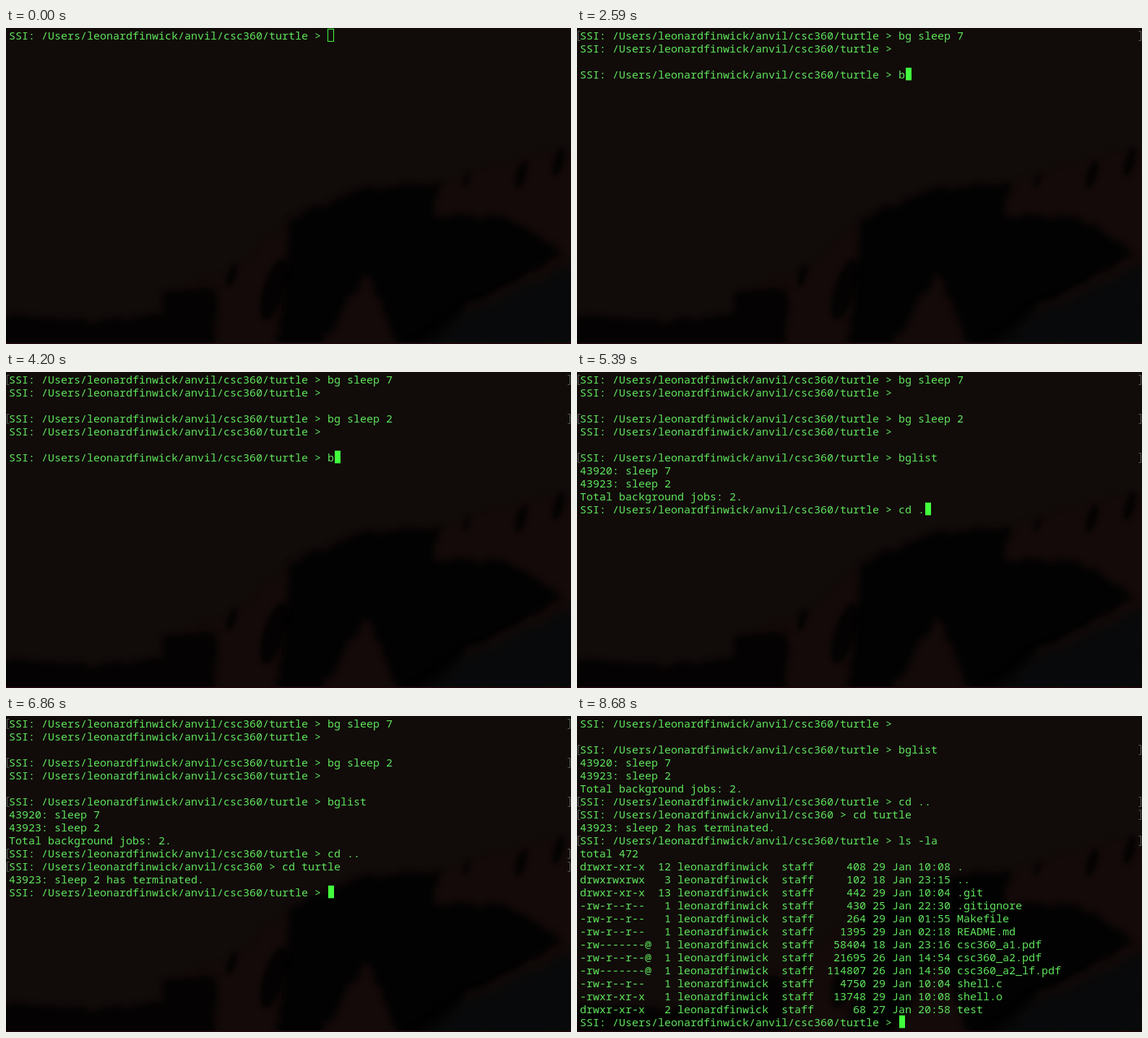
Animation, 782 px wide and 438 px high, one loop 8.75 s. Source, as an HTML page with a canvas:

```html
<!DOCTYPE html>
<html lang="en">
<head>
<meta charset="utf-8">
<title>Shell session</title>
<style>
html, body { margin: 0; width: 100%; height: 100%; overflow: hidden; background: #110b0a; }
#stage { position: relative; width: 782px; height: 438px; overflow: hidden; }
canvas { position: absolute; left: 0; top: 0; }
pre {
  position: absolute; left: 4px; top: 1px; margin: 0;
  font: 300 15px/18px "Noto Sans Mono", "DejaVu Sans Mono", monospace;
  font-variant-ligatures: none;
  color: #5fe65c;
}
</style>
</head>
<body>
<div id="stage"><canvas id="view" width="782" height="438"></canvas><pre id="text"></pre></div>
<script>
const W = 782, H = 438, LOOP = 8750, STEP = 70;
const LEFT = 4, TOP = 1, ROW = 18, COL = 9, ROWS = 24;
const KEY = 97, PAUSE = 100, FOCUS = 280;   // ms per key, before return, until focused
const GREEN = '#42ff3e';
const ctx = document.getElementById('view').getContext('2d');
const text = document.getElementById('text');

const USER = 'leonardfinwick';
const prompt = dir => `SSI: /Users/${USER}/anvil/${dir} > `;
const COURSE = prompt('csc360');
const HOME = prompt('csc360/turtle');

const file = (mode, links, size, date, name) =>
  mode.padEnd(11) + String(links).padStart(3) + ` ${USER}  staff` +
  String(size).padStart(8) + ` ${date} ${name}`;

const listing = [
  'total 472',
  file('drwxr-xr-x', 12, 408, '29 Jan 10:08', '.'),
  file('drwxrwxrwx', 3, 102, '18 Jan 23:15', '..'),
  file('drwxr-xr-x', 13, 442, '29 Jan 10:04', '.git'),
  file('-rw-r--r--', 1, 430, '25 Jan 22:30', '.gitignore'),
  file('-rw-r--r--', 1, 264, '29 Jan 01:55', 'Makefile'),
  file('-rw-r--r--', 1, 1395, '29 Jan 02:18', 'README.md'),
  file('-rw-------@', 1, 58404, '18 Jan 23:16', 'csc360_a1.pdf'),
  file('-rw-r--r--@', 1, 21695, '26 Jan 14:54', 'csc360_a2.pdf'),
  file('-rw-------@', 1, 114807, '26 Jan 14:50', 'csc360_a2_lf.pdf'),
  file('-rw-r--r--', 1, 4750, '29 Jan 10:04', 'shell.c'),
  file('-rwxr-xr-x', 1, 13748, '29 Jan 10:08', 'shell.o'),
  file('drwxr-xr-x', 2, 68, '27 Jan 20:58', 'test')
];

const run = (start, prompt, cmd, ...out) =>
  ({ start, prompt, cmd, out, enter: start + cmd.length * KEY + PAUSE });

const session = [
  run(420, HOME, 'bg sleep 7', HOME, ''),
  run(2560, HOME, 'bg sleep 2', HOME, ''),
  run(4180, HOME, 'bglist', '43920: sleep 7', '43923: sleep 2', 'Total background jobs: 2.'),
  run(5080, HOME, 'cd ..'),
  run(5800, COURSE, 'cd turtle', '43923: sleep 2 has terminated.'),
  run(7100, HOME, 'ls -la', ...listing),
  run(LOOP, HOME, '')
];

function random(seed) {
  return () => (seed = (seed * 16807) % 2147483647) / 2147483647;
}

// dark mountain seen through the window
function backdrop() {
  const c = document.createElement('canvas');
  c.width = W;
  c.height = H;
  const g = c.getContext('2d');
  const rnd = random(41);
  const jitter = () => (rnd() - 0.5) * 8;

  function rock(color, blur, pts) {
    g.filter = `blur(${blur}px)`;
    g.fillStyle = color;
    g.beginPath();
    pts.forEach(([x, y], i) => {
      const [nx, ny] = pts[(i + 1) % pts.length];
      const n = Math.ceil(Math.hypot(nx - x, ny - y) / 8);
      for (let k = 0; k < n; k++) {
        g.lineTo(x + (nx - x) * k / n + jitter(), y + (ny - y) * k / n + jitter());
      }
    });
    g.fill();
  }

  function gully(x, y, size) {
    g.filter = 'blur(3px)';
    g.fillStyle = 'rgba(0,0,0,.75)';
    g.beginPath();
    g.ellipse(x, y, size / 3, size, 0.3, 0, Math.PI * 2);
    g.fill();
  }

  g.fillStyle = '#110b0a';
  g.fillRect(0, 0, W, H);
  rock('#130a09', 3, [[215, 450], [225, 368], [325, 328], [395, 262], [500, 222],
    [600, 215], [755, 167], [790, 180], [790, 450]]);
  rock('#040202', 4, [[-9, 398], [130, 408], [215, 398], [222, 366], [292, 360],
    [290, 450], [-9, 450]]);
  rock('#030202', 4, [[393, 263], [500, 222], [600, 216], [592, 262], [695, 262],
    [772, 312], [640, 385], [600, 450], [545, 450], [500, 338], [430, 450], [375, 450]]);
  rock('#08090a', 8, [[560, 450], [640, 395], [790, 325], [790, 450]]);
  gully(312, 343, 16);
  gully(371, 362, 44);
  gully(637, 211, 10);
  gully(713, 203, 20);
  gully(765, 186, 20);
  g.filter = 'none';
  g.fillStyle = '#1b070b';
  g.fillRect(0, H - 2, W, 2);
  return c;
}

const scene = backdrop();

function bracket(x, y, dir) {
  ctx.beginPath();
  ctx.moveTo(x + 3 * dir, y + 3.5);
  ctx.lineTo(x, y + 3.5);
  ctx.lineTo(x, y + 16.5);
  ctx.lineTo(x + 3 * dir, y + 16.5);
  ctx.stroke();
}

function draw(t) {
  const lines = [], marks = [];
  for (const s of session) {
    const keys = Math.max(0, Math.floor((t - s.start) / KEY) + 1);
    lines.push(s.prompt + s.cmd.slice(0, keys));
    if (t < s.enter) break;
    marks.push(lines.length - 1);
    lines.push(...s.out);
  }
  const last = lines.length - 1;
  const scroll = Math.max(0, lines.length - ROWS);
  const rowY = i => TOP + (i - scroll) * ROW;
  const shown = lines.slice(scroll).join('\n');
  if (text.textContent !== shown) text.textContent = shown;

  ctx.drawImage(scene, 0, 0);
  ctx.lineWidth = 1;
  ctx.strokeStyle = '#5c6259';
  for (const m of marks.filter(m => m >= scroll)) {
    bracket(1.5, rowY(m), 1);
    bracket(W - 1.5, rowY(m), -1);
  }

  const x = LEFT + lines[last].length * COL;
  const y = rowY(last);
  if (t < FOCUS) {
    ctx.strokeStyle = GREEN;
    ctx.strokeRect(x + 0.5, y + 0.5, COL - 1, ROW - 1);
  } else {
    ctx.fillStyle = GREEN;
    ctx.fillRect(x + 1, y, COL - 1, ROW - 0.5);
  }
}

const begin = performance.now();
function tick() {
  const t = (performance.now() - begin) % LOOP;
  draw(Math.floor(t / STEP) * STEP);
  requestAnimationFrame(tick);
}
tick();
</script>
</body>
</html>
```
